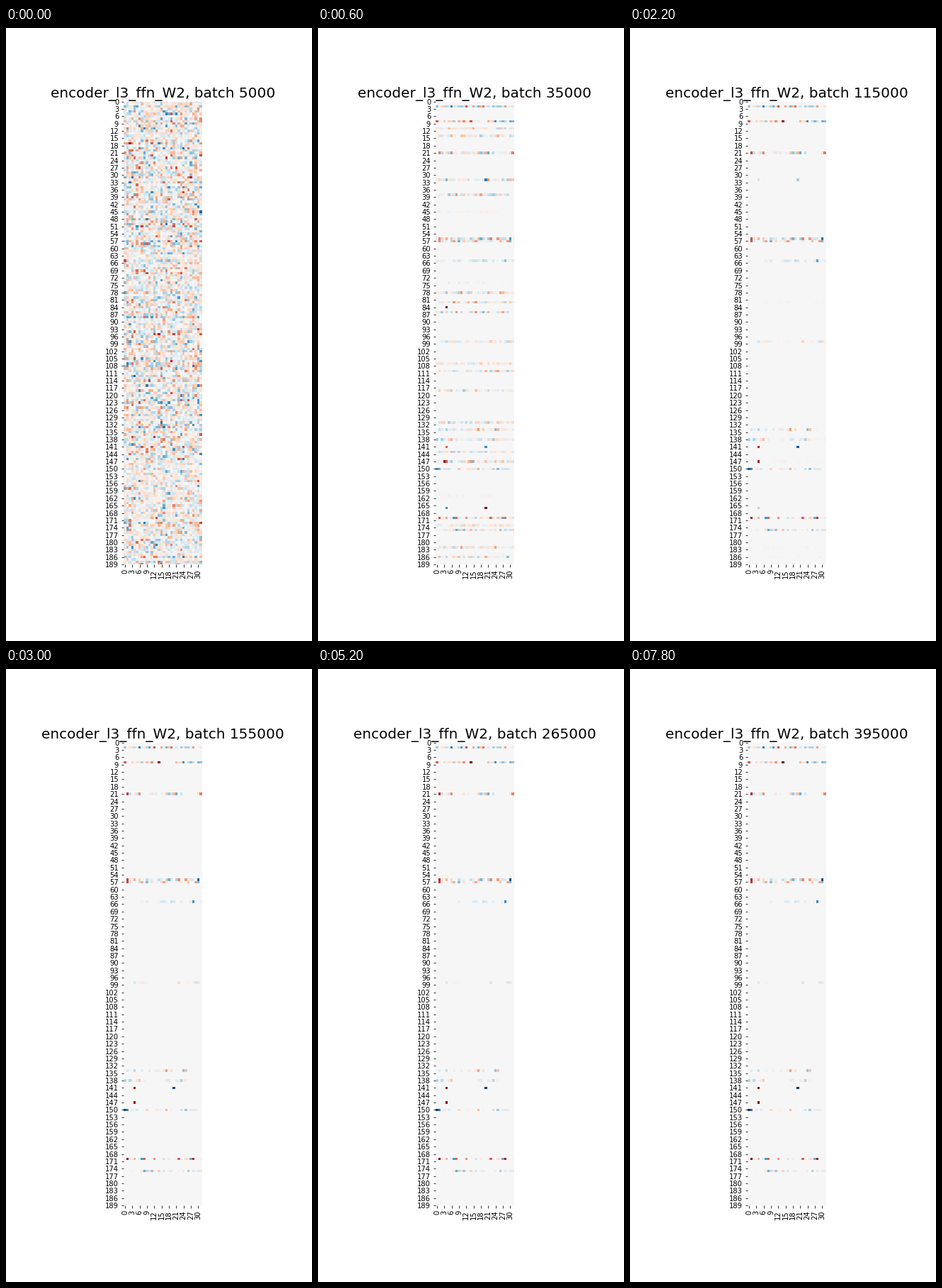
Write a matplotlib script that moves like this. It is 432 px wide and 864 px high and loops after 8000 ms.

```python
import numpy as np
import matplotlib.pyplot as plt
from matplotlib.animation import FuncAnimation

ROWS, COLS, FRAMES = 190, 32, 40
SETTLED = 3  # step at which the initial noise has gone

# rows that stay active: spread of their weights
LASTING = {2: .3, 8: .27, 21: .23, 56: .24, 57: .21, 65: .16, 98: .12,
           134: .2, 138: .16, 150: .21, 170: .26, 175: .23}

# step at which rows have faded out: those rows
FADING = {4: (45, 74, 161, 185), 5.5: (14, 107, 118, 131, 143, 173),
          7: (11, 32, 38, 78, 86, 110), 12: (82, 147, 182, 186)}

# (row, column, final weight) of the strongest weights
STRONG = [(2, 10, -.55), (8, 14, .97), (21, 1, .76), (56, 1, .76),
          (56, 30, -.9), (57, 1, .72), (65, 28, -.63), (141, 4, .92),
          (141, 20, -.98), (147, 4, .95), (150, 0, -.97), (150, 1, -.75),
          (170, 1, .97), (170, 28, .84)]

# (row, column, weight, step at which it has faded out)
PASSING = [(32, 4, -.45, 12), (32, 20, -.72, 12), (84, 4, .98, 5.5),
           (147, 3, .88, 6), (166, 4, -.62, 12), (166, 20, .95, 5.5)]

rng = np.random.default_rng(12)
noise = rng.normal(0, .25, (ROWS, COLS)) * rng.uniform(.6, 1.2, (ROWS, 1))
lifetime = rng.uniform(.9, 2.9, (ROWS, 1))
pattern = np.clip(rng.normal(0, 1, (ROWS, COLS)), -2.2, 2.2)


def fade(step, end):
    return np.clip((end - step) / (end - SETTLED), 0, 1)


def sparsify(v, settle):
    """Small weights vanish while large ones keep growing."""
    kept = np.maximum(np.abs(v) - .13 * settle, 0)
    return np.sign(v) * kept * (1 + .3 * settle)


def trained(step):
    w = np.zeros((ROWS, COLS))
    settle = 1 - np.exp(-max(step - SETTLED, 0) / 9)
    for r, spread in LASTING.items():
        w[r] = sparsify(spread * pattern[r], settle)
    for end, rows in FADING.items():
        spread = min(.2, .08 * (end - 3.6))
        for r in rows:
            w[r] = spread * pattern[r] * fade(step, end)
    for r, c, v in STRONG:
        w[r, c] = v * (.65 + .35 * settle)
    for r, c, v, end in PASSING:
        k = fade(step, end) ** .35
        w[r, c] = v * k + w[r, c] * (1 - k)
    return w


def weights(step):
    mix = min(step / SETTLED, 1)
    return noise * np.clip(1 - step / lifetime, 0, 1) ** .8 + mix * trained(step)


plt.rcParams.update({"font.family": "DejaVu Sans", "font.size": 10})
fig, ax = plt.subplots(figsize=(6, 12), dpi=72)
fig.subplots_adjust(left=.125, right=.9, bottom=.125, top=.88)
mesh = ax.pcolormesh(weights(0), cmap="RdBu_r", vmin=-1, vmax=1)
ax.set_aspect("equal")
ax.set(xlim=(0, COLS), ylim=(ROWS - .5, .5))
ax.spines[:].set_visible(False)
xs, ys = np.arange(0, COLS, 3), np.arange(0, ROWS, 3)
ax.set_xticks(xs + .5, xs, rotation=90)
ax.set_yticks(ys + .5, ys)
title = ax.set_title("", fontsize=20, pad=6, y=1)


def draw(i):
    mesh.set_array(weights(i))
    title.set_text(f"encoder_l3_ffn_W2, batch {5000 + 10000 * i}")
    return mesh, title


anim = FuncAnimation(fig, draw, frames=FRAMES, interval=200, repeat=True,
                     repeat_delay=0, blit=False)
plt.show()
```
